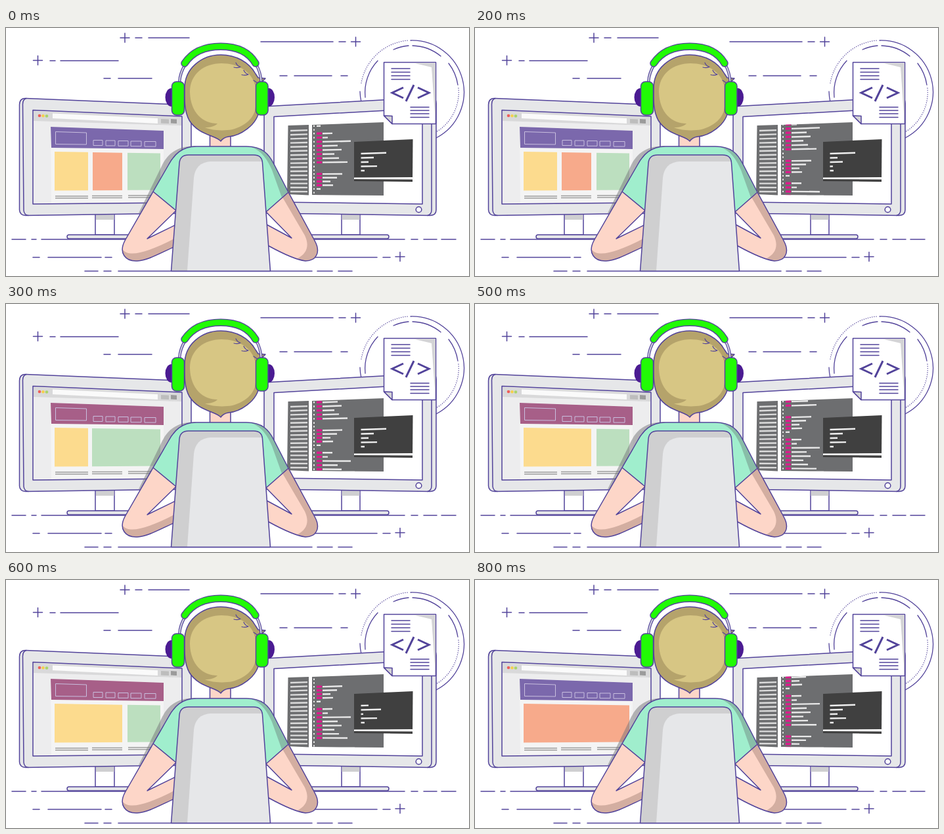
Write an HTML page that moves like this. It is 705 px wide and 379 px high and loops after 0.9 s.

```html
<!DOCTYPE html>
<html lang="en">
<head>
<meta charset="utf-8">
<title>Developer at work</title>
<style>
html, body { margin: 0; width: 100%; height: 100%; overflow: hidden; background: #fff; }
svg { display: block; width: 100vw; height: 100vh; }
.o { stroke: #52439a; stroke-width: 1.5; stroke-linejoin: round; stroke-linecap: round; }
.n { fill: none; }
</style>
</head>
<body>
<svg viewBox="0 0 705 379">
  <defs>
    <clipPath id="panel"><path d="M466 148 575 144V256L466 255Z"/></clipPath>
    <clipPath id="clipL"><path d="M225 250 181 325C171 344 182 357 200 356 216 355 235 344 257 334L258 301 215 322 259 279Z"/></clipPath>
    <clipPath id="clipR"><path d="M430 250 470 325C480 343 472 356 456 356 440 354 420 344 400 333L398 301 435 321 396 281Z"/></clipPath>
  </defs>

  <path id="dashes" class="o n"/>

  <!-- rings -->
  <g class="o n" style="stroke-width:1.3">
    <path d="M616 19A79 79 0 0 1 655 168M541 113A79 79 0 0 1 539 97"/>
    <path d="M541 84A79 79 0 0 1 612 19" stroke-dasharray="0.2 3"/>
    <path d="M547 106A71 71 0 0 1 566 50M590 33A71 71 0 0 1 613 27M619 27A71 71 0 0 1 662 43M674 54A71 71 0 0 1 688 87"/>
    <path d="M689 92A71 71 0 0 1 655 159" stroke-dasharray="0.2 3"/>
  </g>

  <!-- stands -->
  <g class="o" fill="#fff">
    <path d="M136 283H165V316H136ZM511 283H539V316H511Z"/>
    <path d="M137 284H164.500V293H137ZM511.500 284H538.500V293H511.500Z" fill="#cfcfd1" stroke="none"/>
    <rect x="93" y="316" width="125" height="6" rx="3" fill="#e6e7e9"/>
    <rect x="457" y="316" width="126" height="6" rx="3" fill="#e6e7e9"/>
  </g>

  <!-- left monitor -->
  <path class="o" fill="#e6e7e9" d="M20.500 117Q21 107 30 107.500L274 117.500Q282 118 282 126V283L30 286.500Q21 286 20.500 278Z"/>
  <path class="o n" d="M31 107.500Q25 109 25.500 118L27 279Q28 286 34 286.500"/>
  <path fill="#ededee" d="M41 125.500 268 135V267L41 269Z"/>
  <path fill="#d9d9da" d="M42 127 267 136V149L42 142Z"/>
  <circle cx="51" cy="134" r="2.300" fill="#ee5f5b"/>
  <circle cx="56.500" cy="134.200" r="2.300" fill="#f6d04d"/>
  <circle cx="62" cy="134.500" r="2.300" fill="#a9d46c"/>
  <path fill="#fafafa" d="M71 130.500 231 138V146L71 138Z"/>
  <path fill="#bdbdbd" d="M236 139 248 139.500V146L236 145.500Z"/>
  <path fill="#9b9b9b" d="M251 139 260 139.500V146L251 145.500Z"/>
  <path fill="#f4f4f4" d="M68 151 240 157V266L69 267Z"/>
  <path id="banner" d="M68 151 240 157V185L69 183Z"/>
  <path id="menu" fill="none" stroke="#c9bfdf" stroke-width="1"/>
  <g id="cards"></g>
  <path stroke="#9d9d9d" stroke-width="1.500" d="M75 257H125M75 260H125M131 256.500H177M131 259.500H177M186 256H235M186 259H235"/>
  <path class="o n" d="M41 125.500 268 135V267L41 269Z"/>

  <!-- right monitor -->
  <path class="o" fill="#e6e7e9" d="M393 128Q393 120 401 119.500L646 106Q655 106 655 115V278Q655 286 646 286.500L393 283Z"/>
  <path class="o n" d="M642 106.500Q648 108 648 116V278Q648 285 642 286.500"/>
  <path class="o" fill="#fff" d="M408 135.500 634 123V269L408 266Z"/>
  <circle class="o" cx="628.500" cy="277.500" r="4.300" fill="#fff"/>
  <path fill="#6d6e70" d="M429.500 149 461 148V255.500L428 254ZM466 148 575 144V256L466 255Z"/>
  <path id="sidebar" stroke="#dcdcdc" stroke-width="2.400"/>
  <g clip-path="url(#panel)">
    <path id="white" stroke="#e9e9e9" stroke-width="2.400"/>
    <path id="pink" stroke="#dc1a8c" stroke-width="3.400"/>
  </g>
  <path fill="#404040" d="M530 174 619.500 170 619 235 530 234Z"/>
  <path fill="#fff" d="M530 228.500 619 228V231.500L530 231Z"/>
  <path id="term" stroke="#eee" stroke-width="2.400"/>

  <!-- document -->
  <path class="o" fill="#fff" d="M575.500 52.500H654.500V146.500H588L575.500 134Z"/>
  <path fill="#d4d4d6" d="M620 53.300H654V146L648 60Z"/>
  <path class="o" fill="#d4d4d6" d="M575.500 134 588 134.500V146.500Z"/>
  <path class="o n" d="M587 62H615M587 67.500H615M587 73H615M587 78.500H615M616 121H644M616 126H644M616 131H644M616 136.500H644"/>
  <path class="n" stroke="#52439a" stroke-width="3" d="M605 91 588 99 605 107M621 87 609 112M627 91 644 99 627 107"/>

  <!-- person -->
  <path fill="#77777a" opacity=".5" d="M290 180C262 180 247 191 238 209L202 283 215 282 240 240 275 187Z"/>
  <path class="o" fill="#fdd6c8" d="M310.500 160H342V186H310.500Z"/>
  <path fill="#a0eecd" d="M290 181C268 181 256 193 247 210L224 250 259 279 300 300H360L396 281 430 251 408 208C400 192 390 181 366 181Z"/>
  <path fill="#88bda8" d="M374 182C390 188 399 203 405 217L420 259 430 251 408 208C401 193 392 184 374 182Z"/>
  <g fill="#fdd6c8">
    <path d="M225 250 181 325C171 344 182 357 200 356 216 355 235 344 257 334L258 301 215 322 259 279Z"/>
    <path d="M430 250 470 325C480 343 472 356 456 356 440 354 420 344 400 333L398 301 435 321 396 281Z"/>
  </g>
  <path fill="#d3aea1" clip-path="url(#clipL)" d="M176 336C184 352 212 345 258 321V360H170Z"/>
  <path fill="#d3aea1" clip-path="url(#clipR)" d="M420 257 455 317C462 332 459 344 444 352L460 362 485 340 430 245Z"/>
  <path class="o n" d="M290 181C268 181 256 193 247 210L224 250 181 325C171 344 182 357 200 356 216 355 235 344 257 334M258 301 215 322 259 279 224 250M290 181H366C390 181 400 192 408 208L430 251 470 325C480 343 472 356 456 356 440 354 420 344 400 333M398 301 435 321 396 281 430 251"/>
  <path fill="#cfcfd0" d="M251.500 371.500 264 206C265 197 270 194 278 194H377C386 194 390 198 390.500 206L402.500 371.500Z"/>
  <path fill="#e6e7e9" d="M276 371 286 229C288 211 299 204 314 204H390.500L402.500 371Z"/>
  <path class="o n" d="M251.500 371.500 264 206C265 197 270 194 278 194H377C386 194 390 198 390.500 206L402.500 371.500Z"/>

  <!-- head -->
  <path class="o" fill="#b5a36b" d="M327 173C320 164 293 164 279 141 271 126 272 109 272 94 271 61 299 41 327 41 350 41 370 52 380 70L384 76 395 77 386 86V122C384 150 354 165 339 166 332 167 329 170 327 173Z"/>
  <path fill="#d7c684" d="M280 98C280 70 302 54 328 54 353 54 375 66 380 90V120C379 138 363 150 345 155 328 158 312 156 303 152 312 152 318 150 322 146 300 146 281 130 280 98Z"/>
  <path class="o n" style="stroke-width:1.2" d="M350 53Q352 58 357 59.500 352 61.500 347 60M362 64.500Q364 69.500 369 71 364 73 359 71.500M377 80 386 86"/>

  <!-- headphones -->
  <ellipse cx="252" cy="106" rx="9.500" ry="14" fill="#4b1b92"/>
  <ellipse cx="400" cy="106" rx="9" ry="14" fill="#4b1b92"/>
  <path class="o n" style="stroke-width:4.300" d="M273 56Q265 68 264 83M381 56Q388 68 388.500 83"/>
  <path class="n" stroke="#d5d5e0" stroke-width="2" d="M273 56Q265 68 264 83M381 56Q388 68 388.500 83"/>
  <g class="n" stroke-linecap="round">
    <path d="M272 54Q289 28.200 327 28.200T380 54" stroke="#52439a" stroke-width="11.500"/>
    <path d="M272 54Q289 28.200 327 28.200T380 54" stroke="#21fb05" stroke-width="8.700"/>
  </g>
  <rect class="o" fill="#21fb05" x="252.500" y="82" width="19" height="51" rx="7"/>
  <rect class="o" fill="#21fb05" x="380.500" y="82" width="18.500" height="51" rx="7"/>
</svg>
<script>
const $ = id => document.getElementById(id);
const seg = (x1, x2, y, tilt = 0) => `M${x1} ${y}L${x2} ${y - (x2 - x1) * tilt}`;
const plus = (x, y) => `M${x - 7} ${y}h14M${x} ${y - 7}v14`;
const STEP = 100, STEPS = 9;

// Background strokes: y followed by start/end pairs
const strokes = [
  [50, 67, 75, 83, 171], [15, 197, 207, 217, 279], [77, 149, 159, 171, 222],
  [21, 388, 498, 507, 517], [73, 417, 428, 439, 496, 510, 520],
  [323, 9, 30, 39, 46, 54, 185, 470, 607, 617, 627, 636, 656, 663, 685],
  [350.5, 41, 51, 64, 145, 151, 161, 471, 565, 574, 585],
  [371.5, 120, 140, 149, 160, 171, 466, 474, 497, 506, 527]
];
let dashes = plus(48.5, 49.5) + plus(181, 15) + plus(532.5, 21) + plus(600, 349.5);
for (const [y, ...xs] of strokes)
  for (let i = 0; i < xs.length; i += 2) dashes += seg(xs[i], xs[i + 1], y);
$('dashes').setAttribute('d', dashes);

// The screen is seen at an angle: lines rise at the top and level out below
const codeTilt = y => 0.037 - 0.046 * (y - 148) / 108;
const termTilt = y => 0.045 - 0.04 * (y - 174) / 54;

let side = '';
for (let i = 0; i < 16; i++) {
  const y = 157 + i * 6.2;
  side += seg(433, 459, y, codeTilt(y));
}
$('sidebar').setAttribute('d', side);

const menuX = [[133, 147], [152, 166], [171, 186], [190, 206], [211, 228]];
$('menu').setAttribute('d', 'M75.5 158.500 122.500 160V178L75.500 177.500Z' +
  menuX.map(([a, b], i) => `M${a} ${171.5 + i * .5}H${b}V${179.5 + i * .4}H${a}Z`).join(''));

// Code rows: right end of each line, 0 = blank, 1 = closing bracket
const rows = [497, 490, 525, 505, 511, 500, 507, 520, 0, 0, 512, 504, 494, 498, 1, 0];
const PERIOD = 96;
const rowY = i => i < 8 ? i * 6.3 : 50.4 + (i - 8) * 5.7;

function drawCode(scroll) {
  let white = '', pink = '';
  for (let copy = -1; copy < 3; copy++) {
    rows.forEach((end, i) => {
      const y = 161.3 + rowY(i) + copy * PERIOD - scroll, tilt = codeTilt(y);
      white += seg(468, 470, y);
      if (end === 1) white += seg(473, 479, y, tilt);
      else if (end) {
        pink += seg(473, 481, y, tilt);
        white += seg(482, end, y, tilt);
      }
    });
  }
  $('white').setAttribute('d', white);
  $('pink').setAttribute('d', pink);
}

const termA = [579, 560, 552, 565, 546];
const termB = [579, 552, 560, 545, 546];
const termC = [552, 571, 544, 565, 546];
const terms = [termA, termA, termB, termB, termA, termA, termC, termC, termA];
terms[1] = termB;
terms[3] = termA;

const termPath = ends => ends.map((x, i) => {
  const y = 192 + i * 6.5;
  return seg(540.5, x, y, termTilt(y));
}).join('');

const YELLOW = '#fcdb8e', ORANGE = '#f7aa8b', GREEN = '#bcdfbf';
const VIOLET = '#7b68ac', PLUM = '#a75f88';
const three = { bar: VIOLET, cards: [[74, 125, YELLOW], [132, 177, ORANGE], [185, 235, GREEN]] };
const wideGreen = { bar: PLUM, cards: [[74, 125, YELLOW], [131, 235, GREEN]] };
const wideYellow = { bar: PLUM, cards: [[74, 177, YELLOW], [185, 235, GREEN]] };
const wideOrange = { bar: VIOLET, cards: [[74, 235, ORANGE]] };
const pages = [three, three, three, wideGreen, wideGreen, wideYellow, wideYellow, wideOrange, wideOrange];

const card = ([a, b, fill]) => {
  const top = x => 189 + (x - 74) * 0.016, low = x => 248.5 - (x - 74) * 0.006;
  return `<path fill="${fill}" d="M${a} ${top(a)}L${b} ${top(b)}V${low(b)}L${a} ${low(a)}Z"/>`;
};

let last = -1;
function draw(t) {
  const n = Math.floor(t / STEP) % STEPS;
  if (n === last) return;
  last = n;
  $('banner').setAttribute('fill', pages[n].bar);
  $('cards').innerHTML = pages[n].cards.map(card).join('');
  $('term').setAttribute('d', termPath(terms[n]));
  drawCode(10 * n);
}
const start = performance.now();
function tick() {
  draw(performance.now() - start);
  requestAnimationFrame(tick);
}
tick();
</script>
</body>
</html>
```
